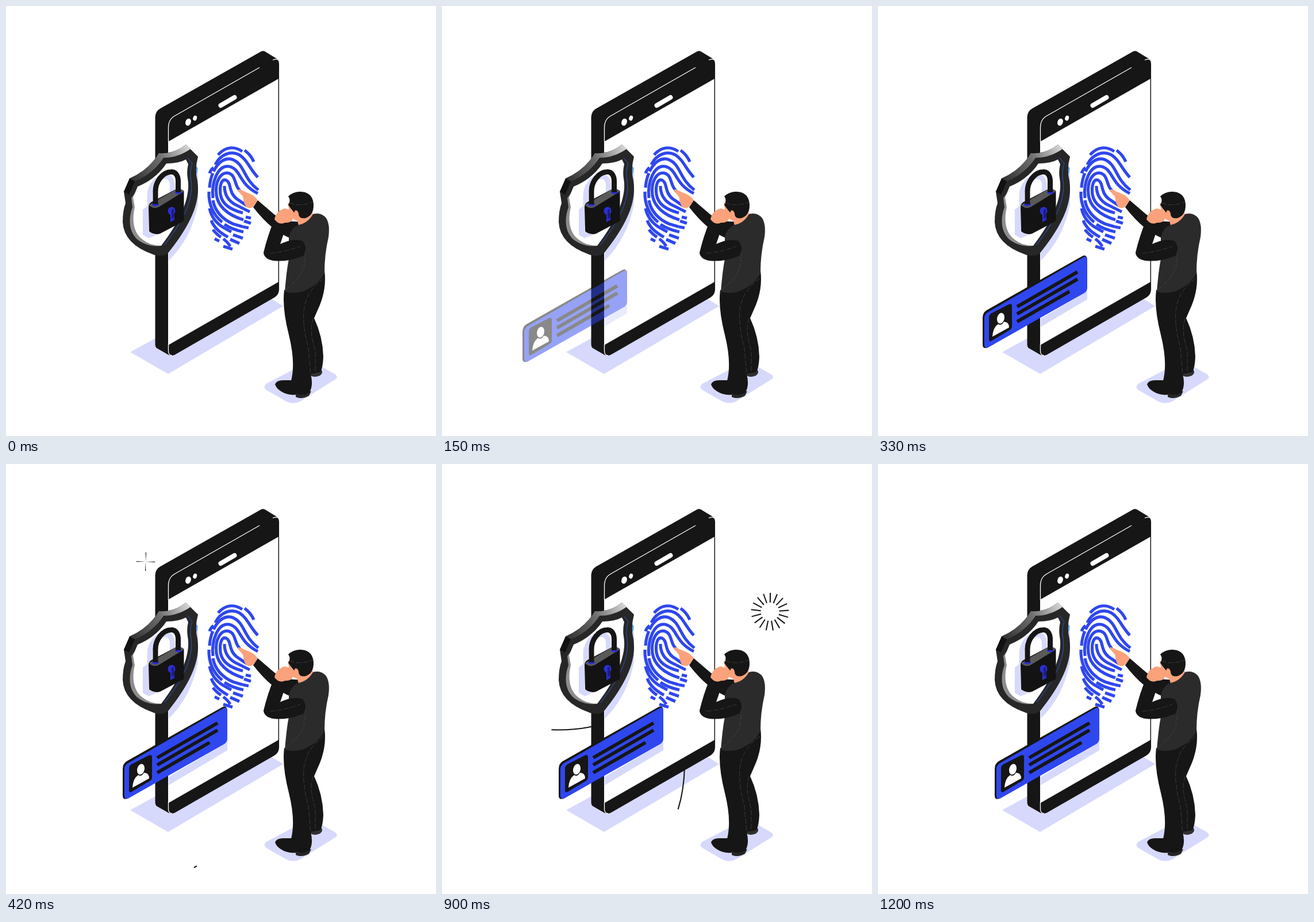
Animation of 748 by 748 pixels, one loop 2700 ms. Source, as an HTML page:

```html
<!DOCTYPE html>
<html lang="en">
<head>
<meta charset="utf-8">
<title>Secure phone</title>
<style>
html, body { margin: 0; width: 100%; height: 100%; overflow: hidden; background: #fff; }
svg { display: block; width: 100vw; height: 100vh; }
.ink { fill: #161616; }
.pale { fill: #d6d9fc; }
.skin { fill: #fba27c; }
.line { fill: none; stroke: #111; stroke-width: 2; }
.seam { fill: none; stroke: #4a4a4a; stroke-width: .7; stroke-dasharray: 9 3; }
.prints { fill: none; stroke: #2f47ee; stroke-width: 5.2; }
</style>
</head>
<body>
<svg viewBox="0 0 748 748">
  <defs>
    <linearGradient id="bevel" x1="215" y1="300" x2="322" y2="245" gradientUnits="userSpaceOnUse">
      <stop offset="0" stop-color="#303030"/><stop offset=".5" stop-color="#6a6a6a"/>
      <stop offset=".56" stop-color="#777"/><stop offset="1" stop-color="#ddd"/>
    </linearGradient>
    <clipPath id="screen"><path d="M283 200H474V600H283Z"/></clipPath>
    <path id="shackle" d="M260 345V322C260 306 272 289 287 288.500C295 288 299.500 295 299.500 305V324" fill="none" stroke-width="9"/>
  </defs>

  <!-- ground and lines behind the phone -->
  <path class="pale" d="M216 602L282 640L482 522L455 505L262 577Z"/>
  <path class="line" id="tail" pathLength="1" d="M327 702C385 672 420 615 422 526"/>
  <path class="line" id="loop" pathLength="1" d="M262 456.500C200 470 81 465 81 395C81 350 125 330 151 321Q180 311 212 312"/>

  <!-- phone -->
  <path class="ink" d="M259.500 193Q260 183 268 178.500L443 79.500Q447 77 451 79.500L470 91Q475 94 475 101V493Q475 502 467 507L294 606.500Q287 610 282 606.500L262 595Q259.500 593 259.500 588Z"/>
  <path fill="#fff" d="M282 236L474 126.500V480L282 590Z"/>
  <path d="M474.300 100V494" stroke="#161616" stroke-width="1.500"/>
  <path d="M282.500 236V211Q282.500 198 292 192L441 107M464 94Q470 91 474 94M282.500 588V601Q283 608 289 608" fill="none" stroke="#fff" stroke-width="1.300"/>
  <g fill="#fff">
    <ellipse cx="317" cy="202" rx="4.700" ry="6.500" transform="rotate(20 317 202)"/>
    <ellipse cx="328.700" cy="195" rx="3.300" ry="4.500" transform="rotate(20 328.700 195)"/>
  </g>
  <path d="M373.500 173L397.500 159" stroke="#fff" stroke-width="8" stroke-linecap="round"/>

  <!-- fingerprint -->
  <g class="prints">
    <path d="M369 259C381 245 397 243 411 253"/>
    <path d="M415 251Q426 259 431 271"/>
    <path d="M354 291Q356 285 361 281"/>
    <path d="M364 276C373 258 391 251 406 259C420 268 423 282 438 298"/>
    <path d="M354 316C356 286 374 260 394 267C416 276 412 300 439 320" stroke-dasharray="26 3 120 0"/>
    <path d="M353 323C352 345 361 364 376 376"/>
    <path d="M360 334C357 308 368 276 388 279C410 284 403 308 438 326"/>
    <path d="M360 338C363 356 376 371 395 379L412 384"/>
    <path d="M414 374L426 378M417 367L426 369M412 384L422 386"/>
    <path d="M413 372C394 366 370 354 366 329C363 305 374 287 388 291C402 296 395 314 412 326"/>
    <path d="M412 360C390 354 376 345 373 328C371 312 375 300 383 303C393 308 386 324 402 336L420 348"/>
    <path d="M380 313C380 328 386 338 398 345L424 358"/>
    <path d="M354 352C357 366 364 376 376 384L392 393"/>
    <path d="M380 380Q394 389 413 393"/>
    <path d="M357 373C362 386 372 394 386 402"/>
    <path d="M395 398L412 404"/>
    <path d="M360 389Q366 397 374 402M363 405L371 409M378 405Q386 411 390 418M390 406L406 413M378 418L394 423"/>
  </g>

  <!-- shield -->
  <path class="pale" d="M283 443Q322 405 334 345V285L300 300L283 420Z"/>
  <path fill="#63a8e8" d="M328 276L334 282L332 291L328 294Z"/>
  <path fill="#272727" d="M215 300Q248 286 266 256Q292 258 313 241L334 262Q328 284 333 304C338 338 326 375 281 431Q271 437 258 433Q205 415 203 376Q203 356 208 343L205 323Z"/>
  <path fill="url(#bevel)" d="M215 300Q248 286 266 256Q292 258 313 241L322 248Q300 264 274 264Q256 292 224 305Z"/>
  <path fill="#111" d="M205 323L215 300L224 305L214 328Z"/>
  <path fill="#8d8d8d" d="M218 334L224 326L228 350V385L270 417Q249 420 231 408C211 393 214 366 220 350Z"/>
  <path fill="#fff" d="M221 333L229 314Q261 301 279 274Q300 274 313 267L317 275Q314 288 316 300C321 326 310 365 270 417Q250 417 236 405C219 391 220 366 224 350Z"/>
  <path d="M316 264L324 274Q319 288 322 304C326 332 314 366 276 415" fill="none" stroke="#2b55c8" stroke-width="1"/>

  <!-- padlock -->
  <path class="pale" d="M238 354L248 346V392L262 398L248 404L238 398Z"/>
  <use href="#shackle" x="-10" y="8" stroke="#d6d9fc"/>
  <path fill="#131313" d="M248 350Q248 344 253 341L295 319Q303 316 309.500 322V374L268 396Q258 399 249 392Z"/>
  <path fill="#5a5a5a" d="M249 346L294 320Q304 316 309 323L265 350Q255 354 249 346Z"/>
  <g fill="#2c2fd2">
    <ellipse cx="260" cy="345" rx="6" ry="3.500"/><ellipse cx="300" cy="324" rx="6" ry="3.500"/>
    <ellipse cx="288" cy="356.500" rx="6.500" ry="7"/><path d="M286 359L292 356L293 372L286 376Z"/>
  </g>
  <use href="#shackle" stroke="#161616"/>
  <path fill="#1c1c86" d="M288 354L292 353V368L288 371Z"/>

  <!-- ID card -->
  <g clip-path="url(#screen)"><g class="slide"><path class="pale" d="M180 605L385 484V498L180 620Z"/></g></g>
  <g class="slide">
    <path class="ink" d="M203 531Q203 521 210 517L377 422.500Q383 420 385 427L212 582Q203 585 203 577Z"/>
    <path fill="#2f47ee" d="M206 531Q206 524 212 520.500L378 425Q385 421 385 430V478Q385 484 380 487L214 581Q206 585 206 576Z"/>
    <path class="ink" d="M214 530Q214 525 218 522.500L249 506.500Q254 505 254 510V545Q254 549 250 551.500L219 570Q214 573 214 567Z"/>
    <g fill="#fff">
      <ellipse cx="234.500" cy="531" rx="6.300" ry="9.500" transform="rotate(14 234.500 531)"/>
      <path d="M220 563Q221 547 230 541Q235 545 240 537Q249 537 249 547Z"/>
    </g>
    <path d="M263 511L368 450.500M263 523.500L368 463M263 537L354 484.500" stroke="#161616" stroke-width="6"/>
  </g>

  <!-- man -->
  <path class="pale" d="M453 657L520 622L552 629L573 641Q579 646 572 650L513 687Q500 694 488 688L453 668Q446 663 453 657Z"/>
  <path fill="#303030" d="M529 639L548 632Q553 638 546 643Q536 647 530 643Z"/>
  <path class="ink" d="M468 658Q471 650 485 651L501 651L506 676Q490 678 478 670Q470 665 468 658Z"/>
  <path fill="#262626" d="M504 674L531 670L527 678Q515 685 504 680Z"/>
  <path class="ink" d="M484 494Q520 500 554 460Q558 490 546 520L536 543Q551 575 552 610Q551 632 546 637L530 640Q535 660 528 672Q516 679 505 674Q494 668 496 652Q504 620 492 572Q480 525 484 494Z"/>
  <path class="seam" d="M553 474Q522 495 518 530Q516 560 526 595L530 640M535 543Q526 560 538 600V636"/>
  <path class="skin" d="M403 320Q406 317 413 322L427 328Q433 331 438 338L430 349Q424 354 417 349L413 339Q414 332 408 327Z"/>
  <path class="ink" d="M438 338L466 362Q482 376 509 375L514 392L498 405Q464 394 430 350Z"/>
  <path class="skin" d="M490 342L507 350L534 360L533 368Q522 384 509 382L507 374L495 368Z"/>
  <path fill="#2b2b2b" d="M508 381Q525 378 534 362Q548 358 557 369Q564 380 561 402Q554 432 554 464Q545 485 515 497Q497 501 485 497Q488 460 492 440V402Q496 386 508 381Z"/>
  <path class="seam" d="M518 412Q526 450 509 472Q496 486 487 494"/>
  <path class="ink" d="M470 374L488 380Q482 400 477 414Q500 403 516 409Q525 420 518 434Q490 446 465 443Q449 440 448 429Q455 400 465 376Z"/>
  <path class="seam" d="M460 430Q485 428 512 418"/>
  <path class="skin" d="M467 371Q470 356 485 352L495 355L500 368Q497 378 485 377Q475 382 467 371Z"/>
  <path class="ink" d="M491 331Q503 320 520 324Q535 329 535 347Q535 364 521 369Q511 371 508 362L505 356L501 359Q495 352 491 346Q496 338 491 331Z"/>
  <path class="skin" d="M502 356Q507 354 509 361L510 369L505 368Z"/>
  <path class="seam" d="M493 342Q510 350 534 341"/>

  <path id="spark" fill="#111"/>
  <path id="burst" fill="none" stroke="#111"/>
</svg>
<script>
const LOOP = 2700, STEP = 30;
const $ = id => document.getElementById(id);
const slides = document.querySelectorAll('.slide');
const clamp = x => Math.max(0, Math.min(1, x));
const part = (t, start, length) => clamp((t - start) / length);
const easeInOut = x => x < .5 ? 2 * x * x : 1 - 2 * (1 - x) ** 2;
const easeOut = x => 1 - (1 - x) ** 2;

function trim(path, from, to) {
  path.style.display = to - from > .001 ? '' : 'none';
  path.style.strokeDasharray = `0 ${from} ${to - from} 2`;
}

function polar(cx, cy, r, angle) {
  return `${(cx + r * Math.cos(angle)).toFixed(2)} ${(cy + r * Math.sin(angle)).toFixed(2)}`;
}

// Four wedges that widen away from the centre
function sparkPath(inner, outer) {
  if (outer - inner < .1) return '';
  let d = '';
  for (let i = 0; i < 4; i++) {
    const a = i * Math.PI / 2 + .025, w = .04;
    const at = (r, side) => polar(243, 170, r, a + side * w);
    d += `M${at(inner, -1)}L${at(outer, -1)}L${at(outer, 1)}L${at(inner, 1)}Z`;
  }
  return d;
}

function burstPath(inner, outer) {
  if (outer - inner < .1) return '';
  let d = '';
  for (let i = 0; i < 17; i++) {
    const a = i * 2 * Math.PI / 17 - Math.PI / 2 + .02;
    d += `M${polar(570.5, 257, inner, a)}L${polar(570.5, 257, outer, a)}`;
  }
  return d;
}

function draw(t) {
  const left = 1 - part(t, 0, 420);
  for (const s of slides) {
    s.setAttribute('transform', `translate(${-98 * left} ${56.6 * left})`);
    s.style.opacity = part(t, 0, 300);
  }

  trim($('tail'), easeInOut(part(t, 750, 260)), easeInOut(part(t, 390, 260)));
  trim($('loop'), easeInOut(part(t, 960, 180)), easeInOut(part(t, 845, 180)));

  $('spark').setAttribute('d',
    sparkPath(26 * easeInOut(part(t, 420, 420)), 26 * easeOut(part(t, 345, 195))));

  const u = t - 660;
  const inner = Math.max(0, 4.5 + .0203 * u + .000115 * u * u);
  const outer = 49 * part(t, 612, 428);
  $('burst').setAttribute('d', burstPath(inner, t < 1200 ? outer : 0));
  $('burst').setAttribute('stroke-width', .5 + 1.5 * part(t, 660, 200));
}

function tick(now) {
  draw(Math.floor((now % LOOP) / STEP) * STEP);
  requestAnimationFrame(tick);
}
draw(0);
requestAnimationFrame(tick);
</script>
</body>
</html>
```
